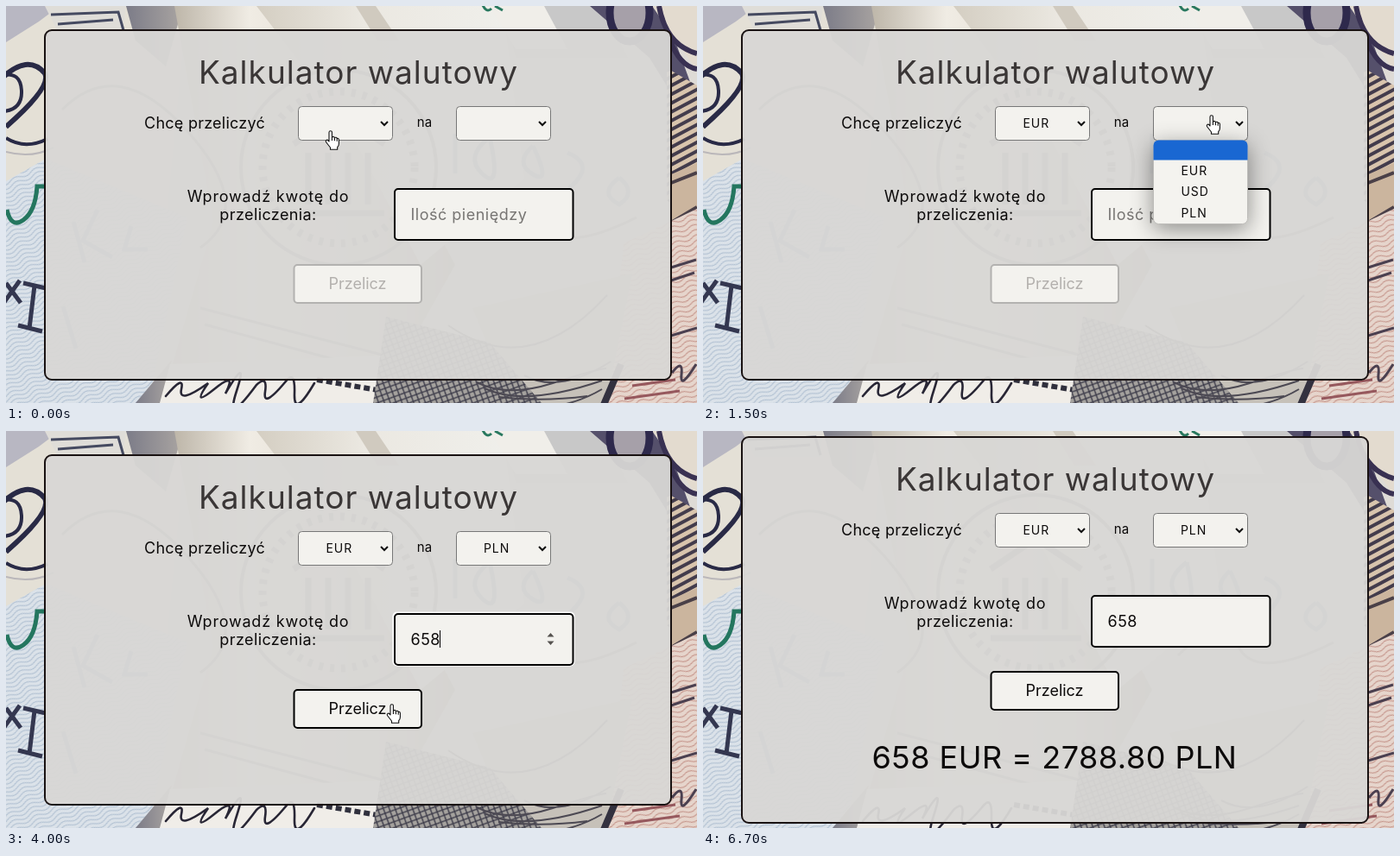
An HTML page that plays this animation: 800x460 px, repeating every 6.8 s.

```html
<!DOCTYPE html>
<html lang="pl">
<head>
<meta charset="utf-8">
<title>Kalkulator walutowy</title>
<style>
html, body { margin: 0; width: 100%; height: 100%; overflow: hidden; background: #dedbd6; }
svg { display: block; }
text { font-family: Inter, "Open Sans", sans-serif; font-size: 18px; fill: #0c0a0a; }
.mid { text-anchor: middle; }
.title { font-size: 37px; fill: #3a3636; letter-spacing: 1px; }
.result { font-size: 36px; letter-spacing: .5px; }
.code { font-size: 14px; letter-spacing: .9px; }
.field { fill: #f3f2ee; stroke: #000; stroke-width: 2; }
.select { stroke: #777; stroke-width: 1; }
.list { filter: drop-shadow(0 6px 13px rgba(0, 0, 0, .42)); }
.off { display: none; }
.cursor path { fill: #fff; stroke: #111; stroke-width: 1.1; stroke-linejoin: round; }
</style>
</head>
<body>
<svg width="800" height="460" viewBox="0 0 800 460">
  <defs>
    <linearGradient id="roll">
      <stop offset="0" stop-color="#b5ad9f"/><stop offset=".3" stop-color="#f0ece4"/>
      <stop offset=".7" stop-color="#ded7ca"/><stop offset="1" stop-color="#a39a8b"/>
    </linearGradient>
    <linearGradient id="paper">
      <stop offset="0" stop-color="#d4cec2"/><stop offset=".4" stop-color="#ebe8e1"/>
      <stop offset="1" stop-color="#f0f0ec"/>
    </linearGradient>
    <linearGradient id="dusk">
      <stop offset="0" stop-color="#7c7c88"/><stop offset="1" stop-color="#aaa5a2"/>
    </linearGradient>
    <pattern id="blue" width="26" height="5" patternUnits="userSpaceOnUse" patternTransform="rotate(-24)">
      <rect width="26" height="5" fill="#dbe2e9"/>
      <path d="M0 2.5q6.5-4 13 0t13 0" fill="none" stroke="#a9bace"/>
    </pattern>
    <pattern id="pink" width="24" height="6" patternUnits="userSpaceOnUse" patternTransform="rotate(-18)">
      <rect width="24" height="6" fill="#e6d5cc"/>
      <path d="M0 3q6-4 12 0t12 0" fill="none" stroke="#c08a80"/>
    </pattern>
    <pattern id="net" width="9" height="9" patternUnits="userSpaceOnUse" patternTransform="rotate(25)">
      <rect width="9" height="9" fill="#a5a29e"/>
      <path d="M0 0l9 9M9 0l-9 9" stroke="#3c3b49" stroke-width="1.4"/>
    </pattern>
    <pattern id="bars" width="9" height="9" patternUnits="userSpaceOnUse" patternTransform="rotate(-28)">
      <rect width="9" height="9" fill="#d8c4ad"/><rect width="9" height="4" fill="#433c4c"/>
    </pattern>
    <clipPath id="round"><rect x="338.5" y="155.5" width="109" height="97" rx="6"/></clipPath>
  </defs>

  <!-- rolled notes -->
  <g fill="none">
    <path fill="#e4e0d6" d="M0 0H210L165 460H0z"/>
    <path fill="#b8b7c2" d="M0 0H62L38 18 0 42z"/>
    <path fill="#dfddd8" d="M45 0H139L135 30H60z"/>
    <path stroke="#454a60" stroke-width="3" d="M52 10L130 7 136 28M60 21L124 16"/>
    <path fill="url(#dusk)" d="M139 0H205L185 70 150 40z"/>
    <path fill="url(#roll)" d="M195 0H300L430 130 520 300 430 460H180L240 250z"/>
    <path fill="url(#paper)" d="M290 0H575L600 200 480 300 390 130z"/>
    <path fill="#d0cabf" d="M405 0H428L455 40H430z"/>
    <path fill="#c8c8c8" d="M575 0H690L720 60H590z"/>
    <path fill="#f0eee9" d="M560 0H623L650 50H590z"/>
    <path stroke="#28785f" stroke-width="3" d="M551 -3Q556 9 562 3M566 0L575 5"/>
    <path fill="#55506b" d="M676 0H760L800 110V150L745 60z"/>
    <path fill="#e3dbcf" d="M748 0H800V75z"/>
    <ellipse cx="722" cy="8" rx="23" ry="33" fill="#a6a0a9" stroke="#2e294c" stroke-width="9"/>
    <path stroke="#393152" stroke-width="6" d="M756 0Q764 45 800 55M768 38Q780 70 800 73"/>
    <path fill="url(#bars)" d="M765 72L800 92V250L765 225z"/>
    <path fill="#cbb59e" d="M768 196L800 182V245L768 260z"/>
    <path stroke="#4a4048" stroke-width="4" d="M770 205L800 193M770 251L800 233"/>
    <path fill="url(#pink)" d="M715 275L800 235V460H695z"/>
    <path stroke="#4b4050" stroke-width="3" d="M770 303L799 294M770 318L797 309M770 382L800 373M771 425Q784 408 782 427T799 415"/>
    <path stroke="#292a46" stroke-width="6" d="M-5 84Q25 55 45 78Q53 94 0 140"/>
    <path stroke="#292a46" stroke-width="4" d="M-4 80Q17 76 18 98T-3 122M0 153Q22 167 48 154"/>
    <path stroke="#bab7ba" stroke-width="2" d="M0 169Q30 177 55 164"/>
    <path fill="url(#blue)" d="M0 203L46 177 210 245 165 460H0z"/>
    <path stroke="#24765f" stroke-width="5" d="M1 236Q6 258 20 248T36 209H44"/>
    <path stroke="#343750" stroke-width="5" d="M0 321L17 344M16 318L-2 343M33 324L27 374M20 321L46 327M14 370L42 377"/>
    <path stroke="#8da2bc" stroke-width="5" d="M78 250L91 297M106 236L89 272 123 291M145 255L137 282 164 282M66 348L81 397"/>
    <g stroke="#8b8587">
      <circle cx="385" cy="187" r="113" stroke-width="4"/>
      <circle cx="385" cy="187" r="88" stroke-width="9" stroke-dasharray="5 8"/>
      <path stroke-width="7" d="M333 160L385 125 438 160M350 170V230M373 170V230M396 170V230M419 170V230M333 240H438"/>
      <path stroke-width="3" d="M65 120Q130 55 210 145T225 280M550 260Q600 210 620 250T730 245M225 350L435 404M230 369L430 423"/>
    </g>
    <path stroke="#889eb8" stroke-width="5" d="M520 148V194M560 152Q530 175 552 195T560 152M610 162Q588 182 610 195T610 162M650 170Q684 184 652 211M710 199q-25 18 0 31q21-14 0-31"/>
    <path fill="url(#dusk)" d="M150 460L192 410 180 460z"/>
    <path fill="#f0ede8" d="M190 415L435 405 429 460H178z"/>
    <path stroke="#282635" stroke-width="2.6" stroke-linecap="round" d="M185 452Q207 426 203 444T234 437Q214 466 241 444T254 449Q281 403 267 446T290 439Q303 427 300 447T323 436Q335 420 334 449T357 437"/>
    <path stroke="#30303d" stroke-width="6" stroke-dasharray="7 4" d="M360 433L430 445"/>
    <path fill="#c6c1b9" d="M540 350L725 310 695 460H585z"/>
    <path fill="url(#net)" d="M440 360L560 390 620 460H425z"/>
    <path stroke="#4c4953" stroke-width="2" d="M545 436Q580 454 633 437T695 420M554 443Q600 465 690 434M570 453Q620 459 673 452M512 370Q605 435 696 335M600 428Q640 450 700 412M620 466Q660 462 690 444"/>
    <path stroke="#33313f" stroke-width="8" d="M712 415L692 462"/>
    <path stroke="#96585d" stroke-width="3" d="M725 440L775 433M716 455L780 446"/>
  </g>

  <g id="panel">
    <rect id="card" x="45" y="28" width="725" height="405" rx="8" fill="#d8d7d5" fill-opacity=".95" stroke="#191212" stroke-width="2"/>
    <text class="title mid" x="408" y="90">Kalkulator walutowy</text>
    <text x="160" y="142" letter-spacing=".25">Chcę przeliczyć</text>
    <text class="mid" x="484.5" y="140" style="font-size:15px">na</text>
    <g id="from">
      <rect class="field select" x="338.5" y="116.5" width="109" height="39" rx="4"/>
      <path d="M434 134l4 4 4-4" fill="none" stroke="#111" stroke-width="2"/>
      <text class="code" x="370.5" y="141"></text>
    </g>
    <g id="to" transform="translate(183 0)">
      <rect class="field select" x="338.5" y="116.5" width="109" height="39" rx="4"/>
      <path d="M434 134l4 4 4-4" fill="none" stroke="#111" stroke-width="2"/>
      <text class="code" x="370" y="141"></text>
    </g>
    <text class="mid" x="303.5" y="227" letter-spacing=".8">Wprowadź kwotę do</text>
    <text class="mid" x="303.5" y="247.5" letter-spacing=".4">przeliczenia:</text>
    <rect id="ring" x="447.5" y="209.5" width="211" height="63" rx="5" fill="#fff"/>
    <rect class="field" x="450" y="212" width="206.5" height="59" rx="4"/>
    <text id="amount" x="468.5" y="247.5" letter-spacing=".5"></text>
    <path id="caret" d="M0 231v20" stroke="#000"/>
    <path id="spin" d="M626.5 238.5l4-4.5 4 4.5zM626.5 243.5l4 4.5 4-4.5z" fill="#55524f"/>
    <rect id="button" class="field" x="333.5" y="300" width="147.5" height="44" rx="4"/>
    <text id="label" class="mid" x="407" y="328">Przelicz</text>
    <text id="result" class="result mid" x="407" y="411.5">658 EUR = 2788.80 PLN</text>
  </g>

  <g id="list" class="list">
    <rect x="338.5" y="155.5" width="109" height="97" rx="6" fill="#f4f3ef" stroke="#bdbcb9"/>
    <g clip-path="url(#round)"><rect id="bar" x="338" width="110" height="24.5" fill="#1967d2"/></g>
    <text class="code" x="370.5" y="195.5">EUR</text>
    <text class="code" x="370.5" y="220">USD</text>
    <text class="code" x="370.5" y="244.5">PLN</text>
  </g>

  <g id="cursor" class="cursor">
    <g id="arrow"><path d="M0 0V15.5L3.6 12.2 6 18 8.7 16.9 6.2 11.2H11z"/></g>
    <g id="hand">
      <path d="M-2 1.5Q-2-.3-.3-.3T1.4 1.5V7Q3.8 5.6 4.4 7.6Q6.6 6.6 7.2 8.5Q9.4 8 9.4 10.2V14.5Q9.4 17 7.7 18.5V21.2H-.5V19L-5.2 13Q-6.4 11-4.8 10.2Q-3.4 9.7-2 12z"/>
      <path d="M1.4 7v4M4.4 7.6v3.6M7.2 8.5v3.2" style="fill:none"/>
    </g>
    <g id="beam"><path d="M-3-7H-1Q0-7 0-6Q0-7 1-7H3M0-6V6M-3 7H-1Q0 7 0 6Q0 7 1 7H3" style="fill:none;stroke-width:1.4"/></g>
  </g>
</svg>
<script>
const LOOP = 6800, STEP = 100, GAP = 183, ROW = 24.5;
const $ = id => document.getElementById(id);
const show = (id, on) => $(id).classList.toggle('off', !on);
const within = (x, y, left, top, w, h) => x >= left && x <= left + w && y >= top && y <= top + h;

// time, x, y of the pointer's hot spot
const route = [
  [0, 376, 145], [200, 387, 141], [300, 387, 141], [500, 388, 186], [700, 388, 186],
  [1200, 589, 127], [1800, 589, 127], [2300, 588, 242], [2600, 588, 242],
  [2900, 553, 248], [3700, 553, 248], [4000, 447, 317], [5200, 447, 317], [5700, 500, 470]
];

function pointerAt(t) {
  const i = route.findIndex(p => p[0] > t);
  if (i < 0) return route[route.length - 1].slice(1);
  const [t0, x0, y0] = route[i - 1], [t1, x1, y1] = route[i];
  const k = (t - t0) / (t1 - t0), e = k * k * (3 - 2 * k);
  return [x0 + (x1 - x0) * e, y0 + (y1 - y0) * e];
}

// The screen refreshes ten times a second and rests twice.
function hold(t) {
  t = Math.floor(t / STEP) * STEP;
  if (t > 3100 && t < 3600) return 3100;
  if (t > 4000 && t < 4700) return 4000;
  return t;
}

function render(time) {
  const t = hold(time % LOOP);
  const [x, y] = pointerAt(t);
  const done = t >= 4700, shift = done ? -21 : 0;
  const openFrom = t >= 300 && t < 700, openTo = t >= 1400 && t < 2600;
  const open = openFrom || openTo, listX = openTo ? GAP : 0;
  const value = t >= 3700 ? '658' : t >= 3600 ? '65' : '';
  const focus = t >= 3000 && !done;

  $('panel').setAttribute('transform', `translate(0 ${shift})`);
  $('card').setAttribute('height', done ? 447 : 405);
  $('from').lastElementChild.textContent = t >= 700 ? 'EUR' : '';
  $('to').lastElementChild.textContent = t >= 2600 ? 'PLN' : '';

  const amount = $('amount');
  amount.textContent = value || 'Ilość pieniędzy';
  amount.style.fill = value ? '#0c0a0a' : '#777573';
  show('ring', focus);
  show('caret', focus);
  const end = value ? amount.getComputedTextLength() : 0;
  $('caret').setAttribute('transform', `translate(${Math.floor(468.5 + end) + .5} 0)`);

  $('button').style.stroke = value ? '#000' : '#b3b2b0';
  $('label').style.fill = value ? '#0c0a0a' : '#b3b0ad';
  show('result', done);

  show('list', open);
  $('list').setAttribute('transform', `translate(${listX} 0)`);
  const row = y > 178 ? Math.min(3, Math.floor((y - 154) / ROW)) : 0;
  $('bar').setAttribute('y', 154 + row * ROW);
  [...$('list').querySelectorAll('text')].forEach((item, i) => {
    item.style.fill = i + 1 === row ? '#fff' : '#0c0a0a';
  });

  const py = y - shift;
  const inList = open && within(x, y, 338 + listX, 156, 110, 97);
  const inInput = !inList && within(x, py, 449, 211, 208, 61);
  const inHand = within(x, py, 338, 116, 110, 40) || within(x, py, 338 + GAP, 116, 110, 40) ||
    (value && within(x, py, 333, 299, 149, 46));
  const kind = inList ? 'arrow' : inInput ? 'beam' : inHand ? 'hand' : 'arrow';
  for (const id of ['arrow', 'hand', 'beam']) show(id, id === kind);
  show('spin', focus || inInput);
  $('cursor').setAttribute('transform', `translate(${Math.round(x)} ${Math.round(y)})`);
}

const start = performance.now();
function tick() {
  render(performance.now() - start);
  requestAnimationFrame(tick);
}
tick();
</script>
</body>
</html>
```
